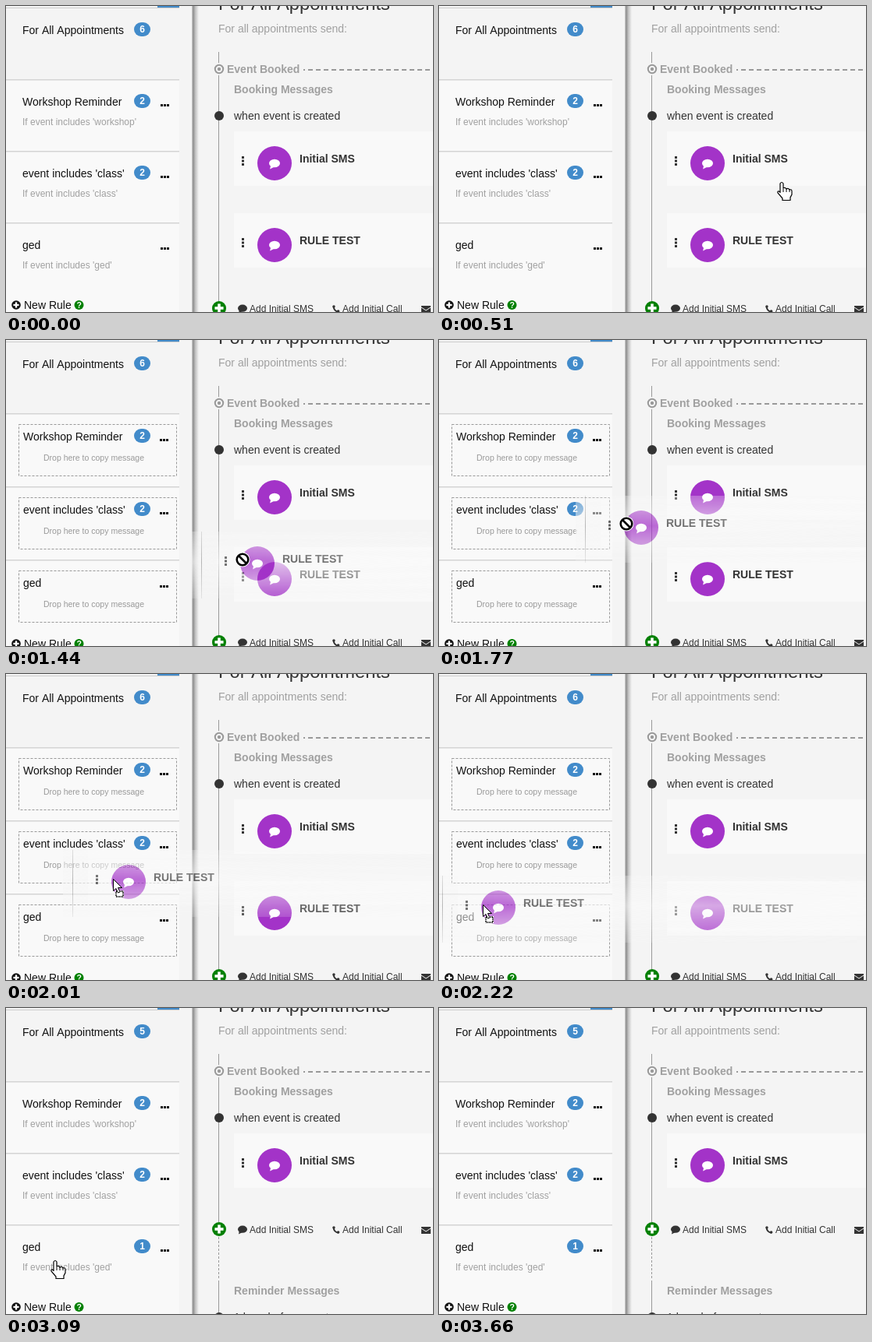
Animation of 547x393 px, one loop 4830 ms. Source, as an HTML page with a canvas:

```html
<!DOCTYPE html>
<html lang="en">
<head>
<meta charset="utf-8">
<title>Copy a message by dragging</title>
<style>
html, body { margin: 0; width: 100%; height: 100%; overflow: hidden; background: #f4f4f4; }
canvas { display: block; }
</style>
</head>
<body>
<canvas id="stage" width="547" height="393"></canvas>
<script>
const W = 547, H = 393, LOOP = 4830, STEP = 30;
const FONT = '"Liberation Sans", Arial, sans-serif';
const PURPLE = '#a333c8', GREEN = '#008000', INK = '#333', MUTED = '#a0a0a0';
const PAGE = '#f4f4f4', PANEL = '#f9f9f9';
const DRAG = 1320, DROP = 3030, MOVED = 3090;
const ctx = document.getElementById('stage').getContext('2d');

// [time, x, y]; positions hold where two neighbours agree
const POINTER_IN = [[300, 541, 152], [450, 470, 205], [630, 376, 272], [780, 336, 295],
  [840, 336, 295], [990, 325, 301]];
const POINTER_OUT = [[3480, 63, 325], [3630, 505, 271]];
const GHOST = [[1320, 344, 307], [1560, 300, 266], [1680, 300, 266], [1770, 259, 241],
  [1950, 180, 258], [2220, 76, 300], [2490, 66, 326], [2760, 82, 335]];

function along(keys, t) {
  let i = 0;
  while (i < keys.length - 2 && t > keys[i + 1][0]) i++;
  const [t0, x0, y0] = keys[i], [t1, x1, y1] = keys[i + 1];
  const k = Math.min(1, Math.max(0, (t - t0) / (t1 - t0)));
  return [Math.round(x0 + (x1 - x0) * k), Math.round(y0 + (y1 - y0) * k)];
}

function text(g, str, x, y, size, color, bold) {
  g.font = `${bold ? 'bold ' : ''}${size}px ${FONT}`;
  g.fillStyle = color;
  g.fillText(str, x, y);
}

function box(g, x, y, w, h, color) {
  g.fillStyle = color;
  g.fillRect(x, y, w, h);
}

function disc(g, x, y, r, color) {
  g.fillStyle = color;
  g.beginPath();
  g.arc(x, y, r, 0, 7);
  g.fill();
}

function line(g, x0, y0, x1, y1, color, width = 1, dash = [], offset = 0) {
  g.strokeStyle = color;
  g.lineWidth = width;
  g.setLineDash(dash);
  g.lineDashOffset = offset;
  g.beginPath();
  g.moveTo(x0, y0);
  g.lineTo(x1, y1);
  g.stroke();
  g.setLineDash([]);
  g.lineDashOffset = 0;
}

function dashedBox(x, y, w, h, color, width, dash) {
  ctx.strokeStyle = color;
  ctx.lineWidth = width;
  ctx.setLineDash(dash);
  ctx.strokeRect(x, y, w, h);
  ctx.setLineDash([]);
}

function shape(g, points, fill, stroke) {
  g.beginPath();
  points.forEach(([x, y]) => g.lineTo(x, y));
  g.closePath();
  g.fillStyle = fill;
  g.fill();
  if (!stroke) return;
  g.strokeStyle = stroke;
  g.lineWidth = 1;
  g.stroke();
}

function plus(g, x, y, r, color) {
  disc(g, x, y, r, color);
  const arm = r * 0.62, w = r * 0.4;
  box(g, x - arm, y - w / 2, arm * 2, w, '#fff');
  box(g, x - w / 2, y - arm, w, arm * 2, '#fff');
}

function bubble(g, x, y, s, color) {
  g.fillStyle = color;
  g.beginPath();
  g.ellipse(x, y - s * 0.07, s * 0.5, s * 0.38, 0, 0, 7);
  g.fill();
  shape(g, [[x - s * 0.34, y + s * 0.1], [x - s * 0.42, y + s * 0.46], [x, y + s * 0.25]], color);
}

function dots(g, x, y, dx, dy, color) {
  for (let i = 0; i < 3; i++) box(g, x + dx * i, y + dy * i, 3, 3, color);
}

// One message, centred on its round icon
function message(g, x, y, name) {
  box(g, x - 52, y - 41, 640, 70, PANEL);
  dots(g, x - 42, y - 9, 0, 4.5, INK);
  disc(g, x, y, 22, PURPLE);
  bubble(g, x, y + 1, 14, '#fff');
  text(g, name, x + 32, y - 1, 14, INK, true);
}

function makeGhost() {
  const c = document.createElement('canvas');
  c.width = 640;
  c.height = 86;
  const g = c.getContext('2d');
  box(g, 0, 0, 640, 86, '#f6f6f6');
  line(g, 12.5, 0, 12.5, 86, '#999');
  message(g, 84, 41, 'RULE TEST');
  // the drag image fades out away from the pointer
  g.globalCompositeOperation = 'destination-in';
  const fade = (x, y, stops) => {
    const grad = g.createLinearGradient(0, 0, x, y);
    stops.forEach(([at, alpha]) => grad.addColorStop(at, `rgba(0,0,0,${alpha})`));
    box(g, 0, 0, 640, 86, grad);
  };
  fade(0, 86, [[0, 0.3], [0.45, 0.74], [1, 0.2]]);
  fade(640, 0, [[0, 0.9], [0.1, 1], [0.6, 0.78], [1, 0.65]]);
  return c;
}
const ghostImage = makeGhost();

function badge(count, y) {
  ctx.fillStyle = '#428bca';
  ctx.beginPath();
  ctx.roundRect(164, y - 9, 21, 18, 9);
  ctx.fill();
  text(ctx, count, 171.2, y + 4, 12, '#fff', true);
}

function sidebar(dragging, counts) {
  box(ctx, 0, 94, 222, H, PANEL);
  box(ctx, 0, 2, 222, 1, '#ccc');
  box(ctx, 194, 0, 28, 2, '#428bca');
  text(ctx, 'For All Appointments', 21, 36, 14, '#111');
  badge(counts[0], 30);
  const rules = [['Workshop Reminder', 'workshop'], ["event includes 'class'", 'class'], ['ged', 'ged']];
  rules.forEach(([name, word], i) => {
    const y = i * (dragging ? 94 : 92);
    box(ctx, 0, 94 + y, 222, 1.5, '#d4d4d4');
    if (dragging) {
      dashedBox(16.5, 108.5 + y, 202, 66, '#999', 1, [3, 2]);
      text(ctx, 'Drop here to copy message', 48, 155 + y, 10.5, '#999');
    } else {
      text(ctx, `If event includes '${word}'`, 21, 153 + y, 12, MUTED);
    }
    const shift = dragging ? 1 : 0;
    text(ctx, name, 21 + shift, 128 + y + shift, 14, '#111');
    dots(ctx, 198 - shift, 126 + y + shift, 4, 0, '#111');
    if (counts[i + 1]) badge(counts[i + 1], 122 + y + shift);
  });
  const y = dragging ? 390 : 384;
  plus(ctx, 13, y, 5.8, '#111');
  text(ctx, 'New Rule', 23, y + 5, 14, '#111');
  disc(ctx, 93.5, y, 6, GREEN);
  text(ctx, '?', 90.4, y + 4, 10.5, '#fff', true);
}

function divider() {
  const grad = ctx.createLinearGradient(238, 0, 247, 0);
  grad.addColorStop(0, '#d8d8d8');
  grad.addColorStop(0.2, '#8c8c8c');
  grad.addColorStop(0.5, '#c0c0c0');
  grad.addColorStop(1, PAGE);
  box(ctx, 238, 0, 9, H, grad);
}

function addRow(y) {
  plus(ctx, 273, y, 9, GREEN);
  y++;
  bubble(ctx, 303, y, 12, INK);
  text(ctx, 'Add Initial SMS', 312, y + 4, 12, INK);
  ctx.strokeStyle = INK;
  ctx.lineWidth = 2;
  ctx.beginPath();
  ctx.moveTo(419.5, y - 3.5);
  ctx.quadraticCurveTo(420, y + 3, 426, y + 3.8);
  ctx.stroke();
  disc(ctx, 420, y - 3, 1.7, INK);
  disc(ctx, 425.6, y + 3, 1.8, INK);
  text(ctx, 'Add Initial Call', 431, y + 4, 12, INK);
  box(ctx, 532, y - 4, 12, 9, INK);
  line(ctx, 532, y - 2, 538, y + 2, PAGE);
  line(ctx, 538, y + 2, 544, y - 2, PAGE);
}

function timeline(moved) {
  text(ctx, 'For All Appointments', 272, 5, 23.7, INK);
  text(ctx, 'For all appointments send:', 272, 34, 14, MUTED);
  line(ctx, 272.5, 59, 272.5, moved ? 275 : 380, '#999');
  disc(ctx, 273, 81, 8, PAGE);
  ctx.strokeStyle = '#999';
  ctx.lineWidth = 2;
  ctx.beginPath();
  ctx.arc(273, 81, 5.2, 0, 7);
  ctx.stroke();
  disc(ctx, 273, 81, 2.2, '#999');
  text(ctx, 'Event Booked', 283, 86, 14, MUTED, true);
  line(ctx, 381, 82, W, 82, '#999', 2, [6, 4], 4);
  text(ctx, 'Booking Messages', 292, 112, 14, MUTED, true);
  disc(ctx, 273, 141, 6, INK);
  text(ctx, 'when event is created', 292, 146, 14, INK);
  message(ctx, 344, 202, 'Initial SMS');
  if (!moved) {
    message(ctx, 344, 307, 'RULE TEST');
    addRow(388);
    return;
  }
  line(ctx, 272.5, 294, 272.5, 349, '#999', 1, [3, 2]);
  line(ctx, 272.5, 350, 272.5, H, '#999');
  addRow(284);
  text(ctx, 'Reminder Messages', 292, 368, 14, MUTED, true);
  disc(ctx, 273, 397, 6, INK);
  text(ctx, '1 hour before event', 292, 402, 14, INK);
}

function arrow(x, y) {
  ctx.save();
  ctx.translate(x + 0.5, y + 0.5);
  shape(ctx, [[0, 0], [0, 15], [3.5, 12], [6, 17.5], [8.5, 16.5], [6, 11], [11, 11]], '#fff', '#000');
  ctx.restore();
}

function dropArrow(x, y) {
  box(ctx, x + 3, y + 15, 11, 9, '#fff');
  dashedBox(x + 4, y + 16, 9, 7, '#000', 2, [1, 1]);
  arrow(x, y);
}

function hand(x, y) {
  ctx.save();
  ctx.translate(x, y);
  ctx.beginPath();
  ctx.moveTo(-2, 13);
  ctx.lineTo(-2, 1);
  ctx.quadraticCurveTo(0, -2, 2, 1);
  ctx.lineTo(2, 7);
  ctx.quadraticCurveTo(4.5, 5.5, 6, 8);
  ctx.quadraticCurveTo(8.5, 6.5, 10, 9);
  ctx.quadraticCurveTo(13, 8, 13, 11);
  ctx.lineTo(13, 15);
  ctx.lineTo(11, 19);
  ctx.lineTo(11, 22.5);
  ctx.lineTo(1, 22.5);
  ctx.lineTo(1, 20);
  ctx.lineTo(-5, 13);
  ctx.quadraticCurveTo(-6, 9.5, -2, 12);
  ctx.closePath();
  ctx.fillStyle = '#fff';
  ctx.fill();
  ctx.strokeStyle = '#000';
  ctx.lineWidth = 1.2;
  ctx.stroke();
  for (const fx of [2, 6, 10]) line(ctx, fx, 8, fx, 12, '#000');
  ctx.restore();
}

function noDrop(x, y) {
  disc(ctx, x, y, 9.5, '#fff');
  ctx.strokeStyle = '#000';
  ctx.lineWidth = 2.6;
  ctx.beginPath();
  ctx.arc(x, y, 7.3, 0, 7);
  ctx.stroke();
  line(ctx, x - 5, y - 5, x + 5, y + 5, '#000', 2.6);
}

function drag(t) {
  const [x, y] = along(GHOST, t);
  ctx.drawImage(ghostImage, x - 84, y - 41);
  const px = x - 20, py = y - 4;
  const overZone = px > 16 && px < 219 && [108, 202, 296].some(top => py + 2 > top && py < top + 66);
  if (overZone) dropArrow(px, py);
  else noDrop(px + 1, py - 1);
}

function pointer(t, moved) {
  const [x, y] = along(t < DRAG ? POINTER_IN : POINTER_OUT, t);
  const onCard = x > 292 && ((y > 161 && y < 231) || (!moved && y > 266 && y < 336));
  if (x < 222 || onCard) hand(x, y);
  else arrow(x, y);
}

function draw(t) {
  const dragging = t >= DRAG && t < DROP, moved = t >= MOVED;
  box(ctx, 0, 0, W, H, PAGE);
  sidebar(dragging, t < MOVED - STEP ? [6, 2, 2, 0] : [5, 2, 2, 1]);
  divider();
  timeline(moved);
  if (dragging) drag(t);
  else if (t >= 300 && t < 3660) pointer(t, moved);
}

const start = performance.now();
function tick() {
  const t = (performance.now() - start) % LOOP;
  draw(Math.floor(t / STEP) * STEP);
  requestAnimationFrame(tick);
}
tick();
</script>
</body>
</html>
```
